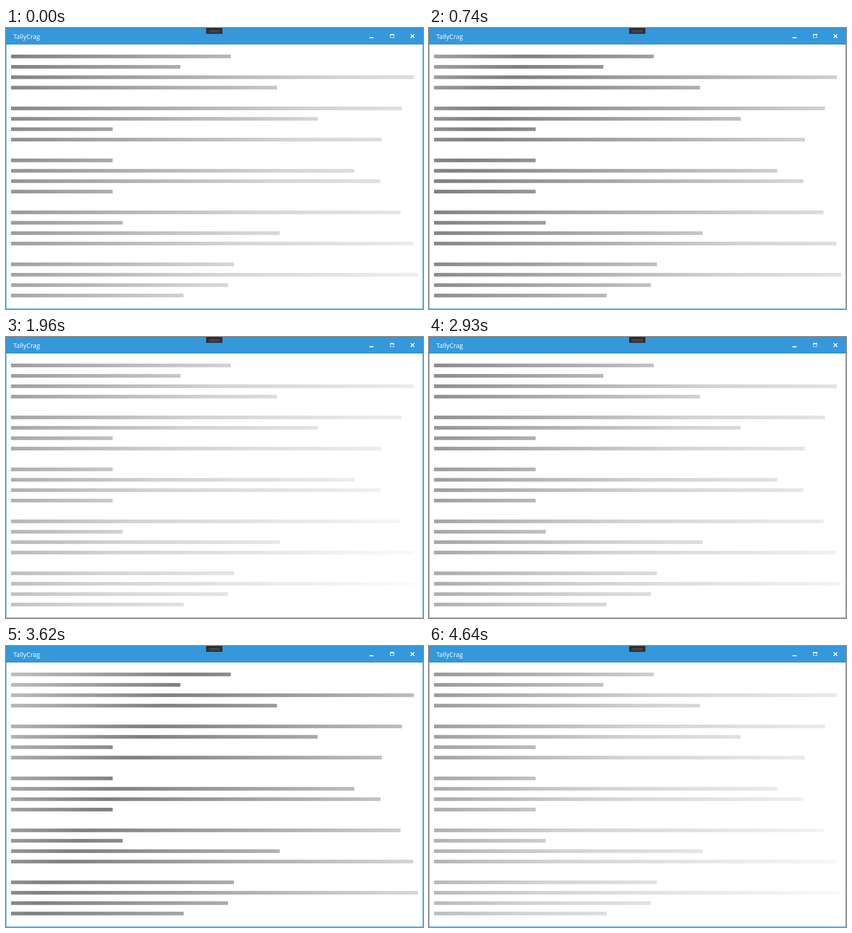
Write an HTML page that moves like this. It is 911 px wide and 615 px high and loops after 4970 ms.

```html
<!DOCTYPE html>
<html lang="en">
<head>
<meta charset="utf-8">
<title>TallyCrag</title>
<style>
  html, body { margin: 0; width: 100%; height: 100%; overflow: hidden; background: #fff; }
  svg { display: block; width: 911px; height: 615px; }
  .title { font: 14px "Open Sans", "Noto Sans", sans-serif; fill: #fff; }

  /* Twice per loop: a quick rise, a short hold, a slow fall, a rest */
  .sweep { animation: sweep 4970ms linear infinite; }
  @keyframes sweep {
    0% { transform: translateX(35px); }
    5.63% { transform: translateX(517px); animation-timing-function: step-end; }
    11.27% { transform: translateX(428px); }
    14.88% { transform: translateX(246px); animation-timing-function: cubic-bezier(.25, .4, .6, .95); }
    39.43% { transform: translateX(-209px); animation-timing-function: step-end; }
    58.95% { transform: translateX(-58px); }
    68.21% { transform: translateX(517px); animation-timing-function: step-end; }
    72.83% { transform: translateX(426px); animation-timing-function: cubic-bezier(.25, .45, .6, .95); }
    93.36%, 100% { transform: translateX(-166px); }
  }
</style>
</head>
<body>
<svg viewBox="0 0 911 615">
  <defs>
    <!-- Diagonal shimmer whose dark crest passes through the local origin -->
    <linearGradient id="shimmer" gradientUnits="userSpaceOnUse" x1="-355" y1="-223.7" x2="1066.6" y2="672">
      <stop offset="0" stop-color="#d3d3d3"/>
      <stop offset=".25" stop-color="#808080"/>
      <stop offset=".625" stop-color="#d3d3d3"/>
      <stop offset="1" stop-color="#fff"/>
    </linearGradient>
    <clipPath id="lines"><path id="bars"/></clipPath>
  </defs>

  <rect width="911" height="615" fill="#fff"/>
  <g clip-path="url(#lines)">
    <rect class="sweep" x="-600" width="2100" height="615" fill="url(#shimmer)"/>
  </g>

  <rect width="911" height="36" fill="#3498db"/>
  <path d="M0 35.5h911" stroke="#2980b9"/>
  <rect x=".5" y=".5" width="910" height="614" fill="none" stroke="#3094da"/>
  <text class="title" x="16" y="24">TallyCrag</text>

  <rect x="437.5" y="-.5" width="35" height="13" fill="#2d2d30" stroke="#424245"/>
  <path d="M443 5.5h24M443 8.5h24" stroke="#6a6a6d"/>

  <g fill="#fff">
    <rect x="794" y="20" width="9" height="2.5"/>
    <path fill-rule="evenodd" d="M839 13h9v8.5h-9zM840 16v4.5h7v-4.5z"/>
  </g>
  <path d="M884 13.8l8 8M892 13.8l-8 8" stroke="#fff" stroke-width="2.1"/>
</svg>

<script>
  const LEFT = 11, TOP = 58.2, PITCH = 22.75, PER_GROUP = 4;

  // Right edge of each line of the placeholder text
  const ends = [
    491, 381, 891, 592,
    865, 681, 233, 821,
    233, 761, 818, 233,
    862, 255, 598, 890,
    498, 900, 485, 388
  ];
  const bar = (end, i) => {
    const row = i + Math.floor(i / PER_GROUP);
    return `M${LEFT} ${TOP + row * PITCH}H${end}v8H${LEFT}z`;
  };
  document.getElementById("bars").setAttribute("d", ends.map(bar).join(""));
</script>
</body>
</html>
```
